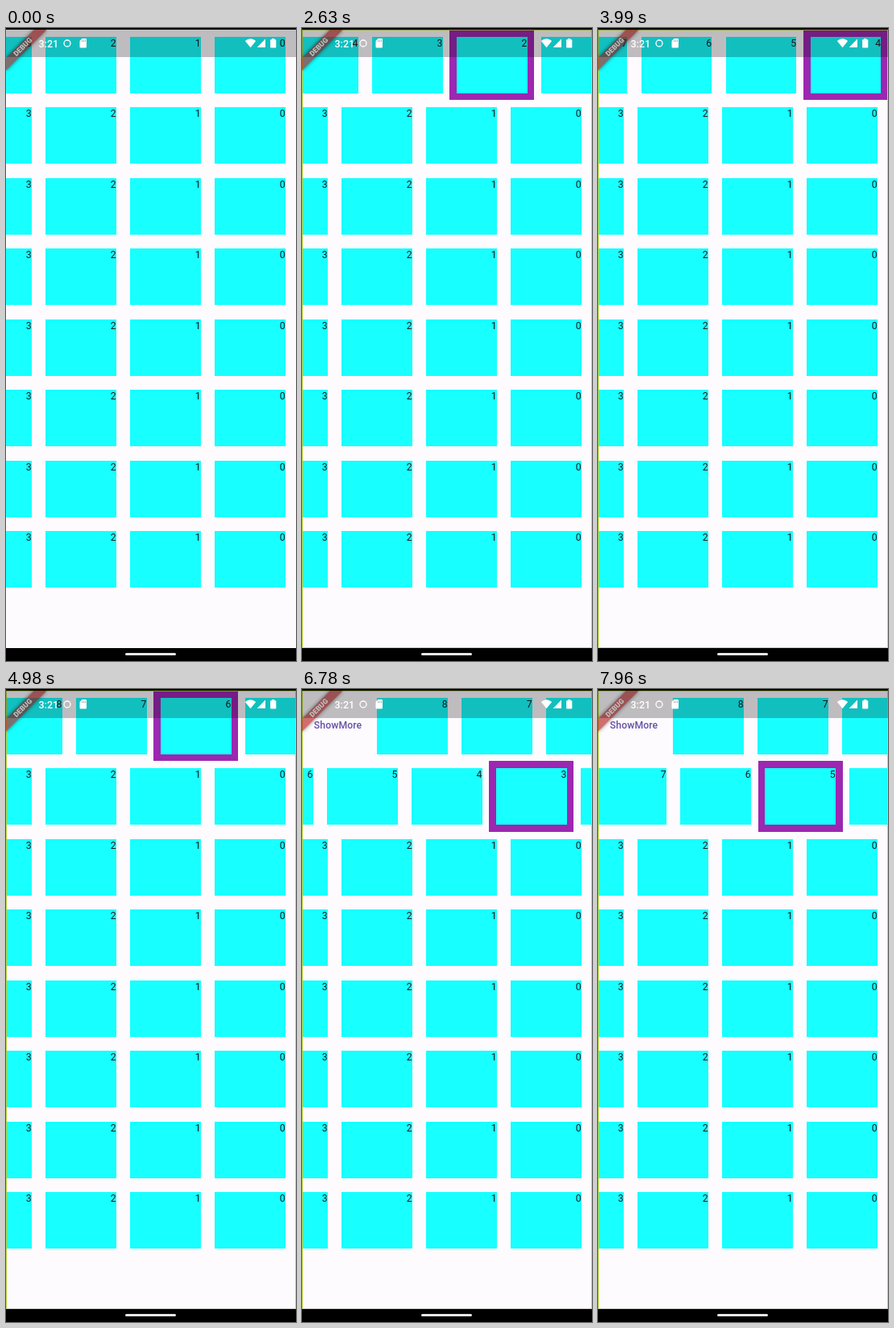
These frames come from a looping animation (360 by 784 pixels, 8 s). An HTML page:

```html
<!DOCTYPE html>
<html lang="en">
<head>
<meta charset="utf-8">
<title>Focus grid</title>
<style>
  html, body { margin: 0; width: 100%; height: 100%; overflow: hidden; background: #000; }
  #stage { position: absolute; left: 0; top: 0; width: 360px; height: 784px; overflow: hidden; background: #000;
    font-family: Roboto, "Noto Sans", sans-serif; }
  #app { position: absolute; left: 0; top: 2px; width: 360px; height: 766px; overflow: hidden; background: #fdfbfe; }
  .row { position: absolute; left: 0; width: 360px; height: 87.5px; }
  .cell { position: absolute; top: 0; width: 105px; height: 87.5px; }
  .cell.on { background: #9c27b0; }
  .card { position: absolute; left: 8.75px; top: 8.75px; width: 87.5px; height: 70px; background: #18ffff;
    font-size: 12.25px; line-height: 17.5px; letter-spacing: .2px; text-align: right; color: #1c1b1f; }
  .more { position: absolute; left: -669.6px; top: 26.25px; width: 80.2px; height: 35px; border-radius: 18px;
    font-size: 12.25px; font-weight: 500; line-height: 35px; letter-spacing: .09px; text-align: center;
    white-space: nowrap; color: #6750a4; }
  #outline { position: absolute; inset: 0; border: 1px solid; border-color: #b4cf30 #c6c6c2 #c6c6c2 #b4d335; opacity: 0; }
  #banner { position: absolute; left: -35px; top: 24.5px; width: 70px; height: 10.5px; transform-origin: 35px -24.5px;
    transform: rotate(-45deg); background: rgba(183, 28, 28, .63); box-shadow: 0 0 5px rgba(0, 0, 0, .5);
    font-size: 8.9px; font-weight: 900; line-height: 10.5px; text-align: center; color: #fff; }
  #shade { position: absolute; left: 0; top: 2px; width: 360px; height: 34px; background: rgba(0, 0, 0, .25); }
  #status { position: absolute; left: 0; top: 0; }
  #pill { position: absolute; left: 148px; top: 774px; width: 63px; height: 2.5px; border-radius: 2px; background: #e6e6e6; }
</style>
</head>
<body>
<div id="stage">
  <div id="app">
    <div id="rows"></div>
    <div id="outline"></div>
    <div id="banner">DEBUG</div>
  </div>
  <div id="shade"></div>
  <svg id="status" width="360" height="40" fill="#fff">
    <text x="40.5" y="23.6" font-size="12.5" font-weight="500">3:21</text>
    <circle cx="76" cy="19" r="4" fill="none" stroke="#fff" stroke-width="1.3"/>
    <path d="M94.5 13H99q1 0 1 1V23.500q0 1-1 1H92.500q-1 0-1-1V16z"/>
    <path d="M94.500 15.200v2M96.500 15.200v2M98.500 15.200v2" stroke="#a9a8aa"/>
    <path d="M296.800 16Q303.500 10.500 310.200 16L303.500 24.300z"/>
    <path d="M322 13.500V24H311.700z"/>
    <path d="M330.200 13h3v1.200h1.300q.8 0 .8.8v8.700q0 .8-.8.8h-5.600q-.8 0-.8-.8V15q0-.8.8-.8h1.300z"/>
  </svg>
  <div id="pill"></div>
</div>
<script>
  const LOOP = 8000, GLIDE = 200, STEP = 105, PAD = 4.375, MAX = 674, ITEMS = 9, ROWS = 8;

  // time, row, item (ITEMS is the button), delay of the scroll
  const moves = [
    [1560, 0, 0, 20], [2020, 0, 1, 20], [2630, 0, 2, -41], [3260, 0, 3, 0],
    [3750, 0, 4, 35], [4390, 0, 5, 35], [4910, 0, 6, 29], [5290, 0, 7, 15],
    [5630, 0, 8, 0], [6020, 0, ITEMS, 0], [6620, 1, 3, 26], [7410, 1, 4, 70], [7890, 1, 5, 16]
  ];

  const clamp = x => Math.min(1, Math.max(0, x));
  const bezier = (a, b, s) => 3 * a * s * (1 - s) ** 2 + 3 * b * s * s * (1 - s) + s ** 3;

  // cubic-bezier(.25, .1, .25, 1)
  function ease(x) {
    if (x <= 0 || x >= 1) return clamp(x);
    let lo = 0, hi = 1;
    for (let i = 0; i < 24; i++) {
      const mid = (lo + hi) / 2;
      if (bezier(.25, .25, mid) < x) lo = mid; else hi = mid;
    }
    return bezier(.1, 1, lo);
  }

  function add(parent, cls, text = "") {
    const el = document.createElement("div");
    el.className = cls;
    el.textContent = text;
    parent.append(el);
    return el;
  }

  const outline = document.getElementById("outline");
  const rows = Array.from({ length: ROWS }, (_, r) => {
    const el = add(document.getElementById("rows"), "row");
    el.style.top = r * 87.5 - .25 + "px";
    const cells = Array.from({ length: ITEMS }, (_, i) => {
      const cell = add(el, "cell");
      cell.style.left = 360 - PAD - STEP * (i + 1) + "px";
      add(cell, "card", i);
      return cell;
    });
    return { el, cells, more: add(el, "more", "ShowMore") };
  });

  function draw(t) {
    const scroll = Array(ROWS).fill(0);
    let focus = null, glow = 0;
    for (const [at, row, item, lag] of moves) {
      if (t < at) break;
      const goal = Math.min(STEP * item + PAD, MAX);
      scroll[row] += (goal - scroll[row]) * ease((t - at - lag) / GLIDE);
      const fade = clamp((t - at) / 150);
      glow = item === ITEMS ? fade : glow * (1 - fade);
      focus = [row, item];
    }
    rows.forEach(({ el, cells, more }, r) => {
      el.style.left = scroll[r] + "px";
      cells.forEach((cell, i) => cell.classList.toggle("on", !!focus && focus[0] === r && focus[1] === i));
      more.style.background = r ? "none" : `rgba(103, 80, 164, ${.12 * glow})`;
    });
    outline.style.opacity = t < 620 ? 0 : .5 + .5 * clamp((t - 620) / 120);
  }

  const start = performance.now();
  function tick() {
    draw((performance.now() - start) % LOOP);
    requestAnimationFrame(tick);
  }
  tick();
</script>
</body>
</html>
```
